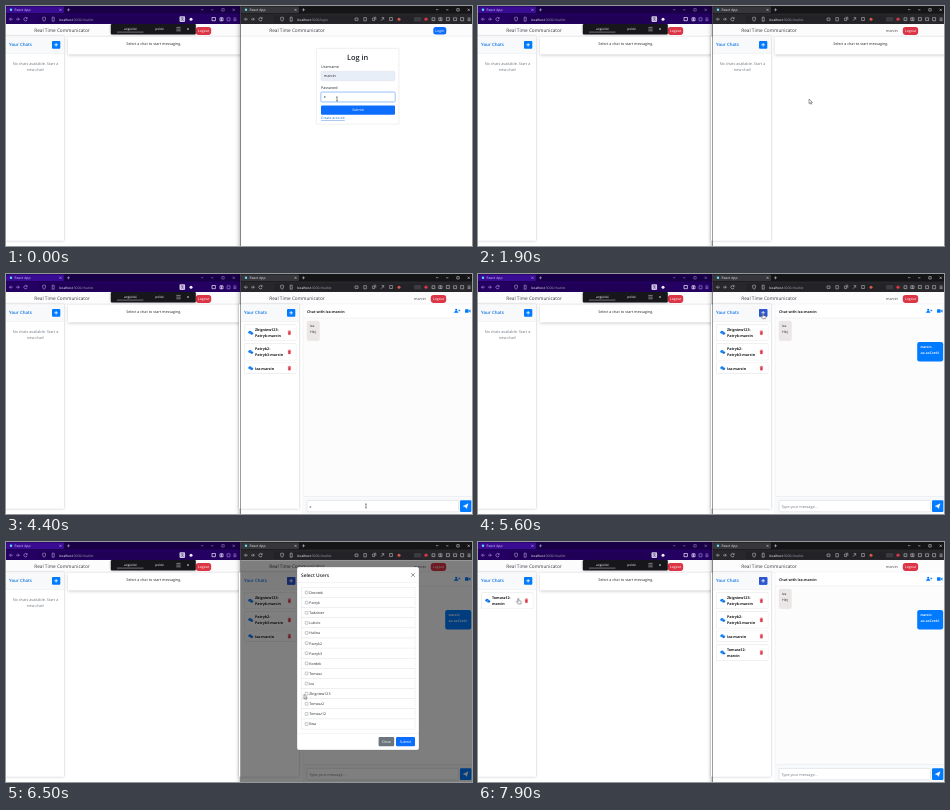
An HTML page that plays this animation: 466 by 240 pixels, repeating every 8000 ms.

```html
<!DOCTYPE html>
<html lang="en">
<head>
<meta charset="utf-8">
<title>Real Time Communicator</title>
<style>
html, body { margin: 0; width: 100%; height: 100%; overflow: hidden; background: #fff; }
svg { display: block; width: 466px; height: 240px; }
text { font-family: "Open Sans", "Noto Sans", sans-serif; text-rendering: geometricPrecision; white-space: pre; }
.shade { filter: drop-shadow(0 .8px 1.3px #0004); }
.strip { filter: drop-shadow(0 1px 1.6px #0003); }
.soft { filter: drop-shadow(0 .4px .6px #0003); }
.window { filter: drop-shadow(-1px 1px 2.5px #0006); }

/* Scene switches: hard cuts on an 8 s clock */
.k { animation: 8s step-end infinite; }
.login { animation-name: login; }
.home { animation-name: home; }
.empty { animation-name: empty; }
.chats { animation-name: chats; }
.hover { animation-name: hover; }
.idle { animation-name: idle; }
.room { animation-name: room; }
.reply { animation-name: reply; }
.draft { animation-name: draft; }
.plus { animation-name: plus; }
.tick { animation-name: tick; }
.press { animation-name: press; }
.before { animation-name: before; }
.after { animation-name: after; }
.modal { animation-name: modal; }
.arrow { animation-name: arrow; }
.hand { animation-name: hand; }
.beam { animation-name: beam; }
@keyframes login { 0% { opacity: 1 } 23.75%, 100% { opacity: 0 } }
@keyframes home { 0% { opacity: 0 } 23.75%, 100% { opacity: 1 } }
@keyframes empty { 0% { opacity: 1 } 26.25%, 100% { opacity: 0 } }
@keyframes chats { 0% { opacity: 0 } 26.25%, 100% { opacity: 1 } }
@keyframes hover { 0% { opacity: 0 } 40% { opacity: 1 } 47.5%, 100% { opacity: 0 } }
@keyframes idle { 0% { opacity: 1 } 46.25%, 100% { opacity: 0 } }
@keyframes room { 0% { opacity: 0 } 46.25%, 100% { opacity: 1 } }
@keyframes reply { 0% { opacity: 0 } 62.5%, 100% { opacity: 1 } }
@keyframes draft { 0% { opacity: 0 } 53.75% { opacity: 1 } 62.5%, 100% { opacity: 0 } }
@keyframes plus { 0% { opacity: 0 } 67.5%, 100% { opacity: 1 } }
@keyframes tick { 0% { opacity: 0 } 85%, 100% { opacity: 1 } }
@keyframes press { 0% { opacity: 0 } 88.75%, 100% { opacity: 1 } }
@keyframes before { 0% { opacity: 1 } 93.75%, 100% { opacity: 0 } }
@keyframes after { 0% { opacity: 0 } 93.75%, 100% { opacity: 1 } }
@keyframes modal {
  0% { opacity: 0 } 71.25% { opacity: .5 } 72.5% { opacity: 1 }
  92.5% { opacity: .5 } 93.75%, 100% { opacity: 0 }
}
@keyframes arrow {
  0% { opacity: 0 } 23.75% { opacity: 1 } 40% { opacity: 0 } 47.5% { opacity: 1 }
  52.5% { opacity: 0 } 62.5% { opacity: 1 } 67.5% { opacity: 0 } 73.75% { opacity: 1 }
  88.75% { opacity: 0 } 93.75% { opacity: 1 } 96.25%, 100% { opacity: 0 }
}
@keyframes hand {
  0% { opacity: 0 } 40% { opacity: 1 } 47.5% { opacity: 0 } 67.5% { opacity: 1 }
  73.75% { opacity: 0 } 88.75% { opacity: 1 } 93.75% { opacity: 0 } 96.25%, 100% { opacity: 1 }
}
@keyframes beam { 0% { opacity: 1 } 23.75% { opacity: 0 } 52.5% { opacity: 1 } 62.5%, 100% { opacity: 0 } }

/* Typing: a cover slides off the text one letter at a time */
.secret { animation: secret 8s infinite; }
.typing { animation: typing 8s infinite; }
@keyframes secret {
  0%, 1.25% { transform: none; animation-timing-function: steps(5) }
  13.75%, 100% { transform: translateX(9.5px) }
}
@keyframes typing {
  0%, 53.75% { transform: none; animation-timing-function: steps(10) }
  61.25%, 100% { transform: translateX(22px) }
}

#mouse { animation: mouse 8s linear infinite; }
@keyframes mouse {
  0%, 30% { transform: translate(331px, 93px) }
  40%, 46.25% { transform: translate(252px, 97.5px) }
  52.5%, 62.5% { transform: translate(360px, 232px) }
  68.75%, 73.75% { transform: translate(284.8px, 39px) }
  82.5%, 86.25% { transform: translate(300px, 171px) }
  90%, 92.5% { transform: translate(399.5px, 198.5px) }
  97.5%, 100% { transform: translate(40.3px, 56.3px) }
}
</style>
</head>
<body>
<svg id="stage" viewBox="0 0 466 240"></svg>
<script>
const BLUE = '#007bff', FORM = '#0d6efd', DEEP = '#2f55cf', RED = '#dc3545', INK = '#212529', GREY = '#6c757d';
const me = 'marcin';
const people = ['Dorotek', 'Patryk', 'Tadzister', 'Lubcio', 'Halina', 'Patryk2', 'Patryk3',
  'Kordek', 'Tomasz', 'Iza', 'Zbigniew123', 'Tomasz2', 'Tomasz12', 'Ewa'];

const rect = (x, y, w, h, fill, more = '') =>
  `<rect x="${x}" y="${y}" width="${w}" height="${h}" fill="${fill}" ${more}/>`;
const text = (x, y, s, size = 3.7, fill = INK, more = '') =>
  `<text x="${x}" y="${y}" font-size="${size}" fill="${fill}" ${more}>${s}</text>`;
const path = (d, stroke, width = .5, fill = 'none') =>
  `<path d="${d}" stroke="${stroke}" stroke-width="${width}" fill="${fill}"/>`;
const dot = (x, y, r, fill) => `<circle cx="${x}" cy="${y}" r="${r}" fill="${fill}"/>`;
const at = (x, y, s) => `<g transform="translate(${x} ${y})">${s}</g>`;
const when = (name, s) => `<g class="k ${name}">${s}</g>`;
const mid = 'text-anchor="middle"', bold = 'font-weight="700"', semi = 'font-weight="600"', medium = 'font-weight="500"';

const button = (x, y, w, h, label, fill, r = 1) =>
  rect(x, y, w, h, fill, `rx="${r}"`) + text(x + w / 2, y + h / 2 + 1.2, label, 3.5, '#fff', mid);

// shift moves the shield and page icons along the address bar
function chrome(c, shift) {
  const line = d => path(d, c.icon, .55);
  return rect(0, 0, 235, 8, c.bar) + rect(0, .6, 58, 6.4, c.tab, 'rx="1"') +
    rect(0, 7.5, 235, 10.7, c.tools) + rect(33, 9.4, 147, 7.6, c.field, 'rx="1"') +
    dot(5, 3.8, 1.2, '#61dafb') + text(8.6, 5, 'React App', 3.4, c.label) +
    line('M53.5 2.8l2 2m0-2l-2 2M61 3.8h3m-1.5-1.5v3') +
    path('M195 3l1.2 1.2 1.2-1.2M205 3.8h2.4M215.8 2.6h2.4v2.4h-2.4zM226.5 2.6l2.4 2.4m0-2.4l-2.4 2.4', c.control) +
    line('M6.8 13.2H3.6m1.4-1.5l-1.5 1.5 1.5 1.5M10 13.2h3.2m-1.4-1.5l1.5 1.5-1.5 1.5') +
    line('M21 12.2a1.7 1.7 0 1 0 .1 1.8m.1-2.6v1.3h-1.3') +
    at(shift, 0, line('M36.6 11.6l1.5-.6 1.5.6c0 2-.4 3.2-1.5 3.8-1.1-.6-1.5-1.8-1.5-3.8z') +
      line('M46.2 11.2h2v4h-2z'));
}

const address = (x, page) =>
  text(x, 14.6, `<tspan fill="#fff">localhost</tspan>:3000/${page}`, 3.3, '#a19cb0');

const leftTools = rect(173.5, 10.3, 5.6, 5.6, '#cfc6e4', 'rx=".8"') +
  path('M175 12h2.4m-1.2-.8v.8m1 .2c-.2 1.4-1 2-2 2.4m.4-2c.3 1 1 1.6 2.2 2', '#2a0a60', .4) +
  dot(185, 13.2, 1.5, '#f2effa') +
  path('M206 11.5h3.4v3.2H206zM214 11.8h3v3h-3zm1.5 0v3', '#f4f0ff', .7) +
  path('M221 11.8h3v3h-3zM227.4 12h3m-3 1.3h3m-3 1.3h3', '#a48fe0', .6);

const rightTools =
  path('M114 12h3v2.4h-3zM122.8 11.6h2.6v3.2h-2.6zM131.6 12h2v2.6h-2zm1.6-.8h1.6v2.6M140 14.8l2.6-3m-2-.2h2.1v2M148.6 11.5h2.8v3h-2.8z', '#d0d0d4') +
  dot(158, 13.2, 1.5, '#d95a4a') + rect(173, 11, 7, 4.6, '#3b3b40', 'rx=".8"') +
  dot(185, 13.2, 1.6, '#d93848') +
  path('M191 11.8h2.8v2.8H191zM197.8 11.8h3.2v2.8h-3.2zm1.6 0v2.8M205.4 11.6h3v3h-3zM212.6 11.8h3v2.8h-3zM219.6 11.6h3v3.2h-3zM226.6 12h3m-3 1.3h3m-3 1.3h3', '#dcdce0');

const navbar = rect(0, 18, 235, 12, '#fdfcfd') + rect(0, 29.8, 235, .5, '#dfdfe4') +
  text(28.3, 26.4, 'Real Time Communicator', 4.72, '#38383f', medium);
const account = text(173, 26.2, me, 3.7, '#3f3f48') + button(189.8, 20.9, 15.4, 8, 'Logout', RED, 2.8);

const sidebar = `<g class="shade">${rect(-2, 30.4, 60, 204.4, '#fff')}</g>` +
  rect(0, 30.4, 58, 16.8, '#f8f9fa') + rect(0, 47, 58, .4, '#dee2e6') +
  text(3, 40.4, 'Your Chats', 4.4, '#0a72e6', semi);
const plusButton = fill => rect(46, 34.9, 8.3, 7.8, fill, 'rx="1"') +
  path('M48.4 38.8h3.5m-1.75-1.75v3.5', '#fff', .8);
const noChats = text(29.5, 59, 'No chats available. Start a', 3.8, GREY, mid) +
  text(29.5, 65, 'new chat!', 3.8, GREY, mid);
const prompt = `<g class="strip">${rect(62, 30.8, 174, 17.6, '#fff')}</g>` +
  text(147.8, 39.3, 'Select a chat to start messaging.', 3.7, INK, mid);

const bubbles = '<ellipse cx="-.6" cy="-.5" rx="1.8" ry="1.5" fill="#007bff"/>' +
  '<ellipse cx="1" cy=".7" rx="1.6" ry="1.3" fill="#0a6be0" stroke="#fff" stroke-width=".25"/>';
const trash = path('M-1.6-1.5h3.2M-.5-2h1', RED, .55) + path('M-1.2-1h2.4l-.2 3h-2z', RED, .3, RED);

function card(y, lines, fill = '#fff') {
  const h = lines.length * 5.9 + 4.4, c = y + h / 2;
  return `<g class="soft">${rect(3.4, y, 51.6, h, fill, 'rx="1" stroke="#eff0f2" stroke-width=".3"')}</g>` +
    at(9.7, c, bubbles) + at(48.4, c, trash) +
    lines.map((s, i) => text(14, y + 6.5 + i * 5.9, s, 3.65, '#16181b', bold)).join('');
}

const newCard = y => card(y, ['Tomasz12-', me]);

const loginForm = rect(75.3, 42.3, 82.6, 75.8, '#fff', 'rx="1" stroke="#dcdfe3" stroke-width=".5"') +
  text(116.6, 54, 'Log in', 7.4, INK, mid + ' ' + semi) +
  text(80, 62, 'Username') + rect(80, 65.3, 74, 9.4, '#e8eef8', 'rx="1.2" stroke="#d7dce3" stroke-width=".4"') +
  text(83, 71.4, me) + text(80, 83, 'Password') +
  rect(80, 86.2, 74, 9.6, '#fff', 'rx="1.2" stroke="#bfdaff" stroke-width="1.4"') +
  rect(80, 86.2, 74, 9.6, '#fff', 'rx="1.2" stroke="#76acf5" stroke-width=".5"') +
  [...Array(6).keys()].map(i => dot(83.9 + i * 1.9, 91, .7, INK)).join('') +
  rect(84.8, 88, 12, 6, '#fff', 'class="secret"') +
  button(80, 99.6, 74, 9.2, 'Submit', FORM) +
  text(80, 113.4, 'Create account', 3.4, '#0d63d8', 'text-decoration="underline"');

const userPlus = dot(-.8, -1.2, 1.1, BLUE) + path('M-2.8 1.8c0-2.4 4-2.4 4 0z', BLUE, .2, BLUE) +
  path('M1.2-.5h2.2m-1.1-1.1v2.2', BLUE, .6);
const camera = rect(-2.6, -1.7, 3.6, 3.4, BLUE, 'rx=".5"') + path('M1.3-.3l1.5-1.1v2.8l-1.5-1.1z', BLUE, .2, BLUE);

const reply = 'aa aaCześć';
const room = rect(62, 30.4, 173, 210, '#fff') + rect(62, 44, 173, 178.6, '#fcfcfd') +
  rect(62, 43.8, 173, .4, '#dee2e6') + rect(61.8, 30.4, .4, 210, '#e2e4e8') +
  text(66, 38.7, `Chat with Iza-${me}`, 3.65, INK, bold) + at(216, 37, userPlus) + at(226.6, 37, camera) +
  rect(65.8, 46.8, 13, 20.2, '#ebe7e6', 'rx="2.2"') +
  text(69, 53.2, 'Iza', 3.2, '#444', semi) + text(69, 58.8, 'Hej', 3.6) +
  when('reply', rect(204.2, 68, 26, 19.4, BLUE, 'rx="2.2"') +
    text(207.4, 74.3, me, 3.2, '#fff', bold) + text(207.4, 80, reply, 3.6, '#fff', semi)) +
  rect(62, 222.4, 173, 18, '#f8f9fa') + rect(62, 222.4, 173, .4, '#dee2e6') +
  rect(66, 226.4, 151.5, 11.4, '#fff', 'rx="1" stroke="#ced4da" stroke-width=".5"') +
  text(68.4, 233.5, 'Type your message...', 3.7, '#70767d') +
  when('draft', rect(67, 227, 50, 10, '#fff') + text(68.4, 233.5, reply) +
    rect(68, 228, 24, 8, '#fff', 'class="typing"')) +
  rect(219, 226.2, 11.4, 11.8, BLUE, 'rx="1"') + path('M222.3 232.2l4.8-2.4-1.4 4.8-1.2-1.6zl4.8-2.4-2.6 3.2', '#fff', .3, '#fff');

const row = (name, i) => {
  const y = 45.4 + i * 10.12;
  const box = rect(64.2, y + 3.7, 2.8, 2.8, '#fff', 'rx=".5" stroke="#777" stroke-width=".4"');
  const tick = name !== 'Tomasz12' ? '' : when('tick',
    rect(64, y + 3.5, 3.2, 3.2, '#0d6ed8', 'rx=".5"') + path(`M64.8 ${y + 5.1}l.7.7 1.2-1.5`, '#fff', .5));
  return rect(60.2, y, 113.8, 10.12, '#fff', 'stroke="#dfe2e6" stroke-width=".4"') + box + tick +
    text(68.3, y + 6.5, name, 3.6);
};

const modal = rect(0, 18.2, 231, 222, '#000', 'opacity=".5"') +
  rect(56, 25, 122, 183, '#fff', 'rx="2" stroke="#777" stroke-width=".3"') +
  text(60, 35.2, 'Select Users', 4.8, INK, semi) +
  path('M170.2 31.2l3.6 3.6m0-3.6l-3.6 3.6', '#555', .6) + rect(56, 40.6, 122, .4, '#dee2e6') +
  people.map(row).join('') + rect(56, 191, 122, .4, '#dee2e6') +
  button(137.6, 195, 15.6, 9.2, 'Close', GREY, 1.2) + button(155, 195, 19, 9.2, 'Submit', FORM, 1.2) +
  when('press', button(155, 195, 19, 9.2, 'Submit', '#1553b8', 1.2));

const popup = `<g class="shade">${rect(104.8, 18, 85, 10.6, '#17161b', 'rx="1"')}</g>` +
  text(124.5, 24.3, 'angielski', 3.2, '#fff', mid) + rect(111, 25.8, 26.5, .5, '#c4c2cc') +
  text(153.6, 24.3, 'polski', 3.2, '#fff', mid) +
  path('M170.3 21.4h4.4m-4.4 1.7h4.4m-4.4 1.7h4.4M181 22l2 2m0-2l-2 2', '#d8d8dc', .5);

const purple = { bar: '#190046', tab: '#3a0c94', tools: '#240062', field: '#1f0056',
  label: '#d9ccff', icon: '#c3b0f0', control: '#a08cd0' };
const dark = { bar: '#151517', tab: '#36363b', tools: '#28282c', field: '#232327',
  label: '#ececf0', icon: '#cfcfd4', control: '#e4e4e8' };

const left = chrome(purple, 0) + leftTools + address(53, 'chatlist') + navbar + account + prompt +
  sidebar + plusButton(BLUE) + when('before', noChats) + when('after', newCard(50.6)) + popup;

const iza = ['Iza-' + me];
const right = chrome(dark, 3) + rightTools + navbar +
  when('login', address(56, 'login') + button(192.3, 21, 13, 7.4, 'Login', FORM, 2.5) + loginForm) +
  when('home', address(56, 'chatlist') + account + when('idle', prompt) + when('room', room) + sidebar +
    plusButton(BLUE) + when('plus', plusButton(DEEP)) + when('empty', noChats) +
    when('chats', card(50.6, ['Zbigniew123-', 'Patryk-' + me]) + card(69.8, ['Patryk2-', 'Patryk3-' + me]) +
      card(89, iza) + when('hover', card(89, iza, '#fafbfc')) + when('after', newCard(102.4)))) +
  when('modal', modal);

const mouse =
  when('arrow', path('M0 0v4.6l1.1-1 .8 1.7.8-.4-.8-1.6h1.5z', '#111', .4, '#fff')) +
  when('hand', path('M-.5.4q.6-.8 1.1 0v2l2 .5q.6.2.5.9l-.5 1.9H-.2L-1.8 3.6q0-.7.7-.5l.6.6z', '#111', .4, '#fff')) +
  when('beam', path('M-1-2h.7l.3.3.3-.3H1M0-1.7v3.4M-1 2h.7l.3-.3.3.3H1', '#222', .5));

document.getElementById('stage').innerHTML =
  rect(0, 0, 466, 240, '#fff') + left +
  at(235, 0, `<g class="window">${rect(0, -5, 240, 250, '#fff')}</g>` + right) +
  rect(234.4, 0, .6, 240, '#5a5a60') + `<g id="mouse">${mouse}</g>`;
</script>
</body>
</html>
```
